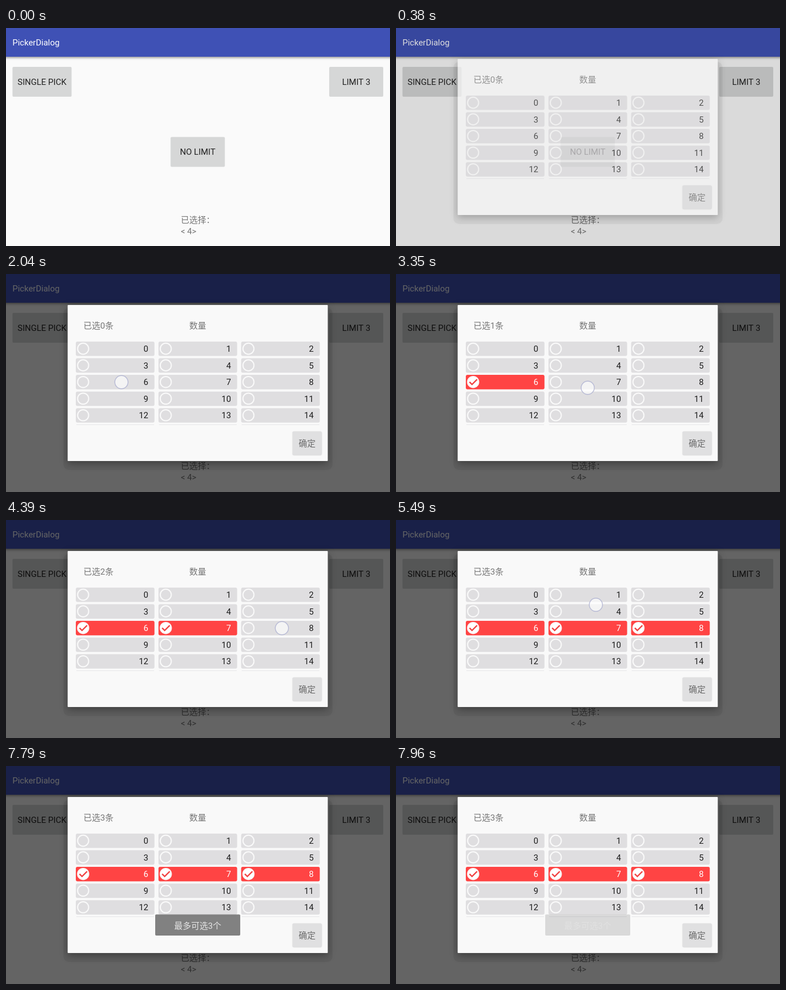
Write an HTML page with a canvas that moves like this. It is 682x387 px and loops after 8000 ms.

```html
<!DOCTYPE html>
<html lang="zh">
<head>
<meta charset="utf-8">
<style>
html, body { margin: 0; width: 682px; height: 387px; overflow: hidden; background: #fafafa; }
canvas { display: block; }
</style>
</head>
<body>
<canvas id="stage" width="682" height="387"></canvas>
<script>
const ctx = document.getElementById('stage').getContext('2d');
const LOOP = 8000;
const FONT = '15px Roboto, "Noto Sans CJK SC", "Noto Sans CJK", sans-serif';

// Stepped values: [start time, value]
const DIALOG = [[0, 0], [280, .3], [380, .72], [440, .9], [530, 1]];
const DIM = [[0, 0], [280, .04], [380, .13], [440, .35], [530, .6]];
const TOAST = [[0, 0], [5680, .15], [5740, .32], [5800, .5], [5850, .66], [5900, .8],
  [5955, .92], [6010, 1], [7790, .8], [7850, .6], [7910, .4], [7960, .22]];

// Taps: when, where, and which cell gets checked
const TAPS = [
  { at: 180, x: 622, y: 96 },
  { at: 2040, x: 205, y: 192, cell: 6 },
  { at: 3350, x: 340.5, y: 202, cell: 7 },
  { at: 4390, x: 490, y: 192, cell: 8 },
  { at: 5490, x: 355, y: 150.5 }
];

const stepAt = (steps, t) => steps.filter(s => s[0] <= t).pop()[1];

function box(x, y, w, h, fill, r = 2) {
  ctx.fillStyle = fill;
  ctx.beginPath();
  ctx.roundRect(x, y, w, h, r);
  ctx.fill();
}

function text(str, x, y, fill, align = 'left') {
  ctx.fillStyle = fill;
  ctx.textAlign = align;
  ctx.fillText(str, x, y);
}

function circle(x, y, r, fill, stroke, width) {
  ctx.beginPath();
  ctx.arc(x, y, r, 0, 7);
  ctx.fillStyle = fill;
  ctx.fill();
  ctx.strokeStyle = stroke;
  ctx.lineWidth = width;
  ctx.stroke();
}

function shadow(color, blur, dy) {
  ctx.shadowColor = color;
  ctx.shadowBlur = blur;
  ctx.shadowOffsetY = dy;
}

function button(label, x, y, w) {
  box(x, y, w, 53, '#d6d7d7');
  text(label, x + w / 2, y + 31.8, '#212121', 'center');
}

function page() {
  box(0, 0, 682, 387, '#fafafa', 0);
  ctx.save();
  shadow('rgba(0,0,0,.4)', 4, 1.5);
  box(-10, -10, 702, 61, '#3f51b5', 0);
  ctx.restore();
  text('PickerDialog', 11.5, 31, '#fff');
  button('SINGLE PICK', 11.5, 69, 105);
  button('LIMIT 3', 574, 69, 96);
  button('NO LIMIT', 292.3, 193.5, 96.4);
  text('已选择：', 310.5, 346, '#757575');
  text('< 4>', 310.5, 366, '#757575');
}

function cell(n, checked) {
  const x = 124 + n % 3 * 146.8, y = 120 + Math.floor(n / 3) * 29.55;
  box(x, y, 139.7, 25.6, checked ? '#ff4444' : '#dfdee0', 3);
  circle(x + 13, y + 12.6, 9.8, checked ? '#fff' : '#dfdee0', '#fafafa', 2);
  if (checked) {
    ctx.strokeStyle = '#f04343';
    ctx.lineWidth = 2.4;
    ctx.beginPath();
    ctx.moveTo(x + 6.5, y + 12.5);
    ctx.lineTo(x + 11, y + 17);
    ctx.lineTo(x + 20, y + 8);
    ctx.stroke();
  }
  text(n, x + 128.8, y + 18.2, checked ? '#fff' : '#1c1c1c', 'right');
}

function dialog(t) {
  const checked = TAPS.filter(p => p.cell && t >= p.at + 110).map(p => p.cell);
  box(102, 60, 478, 288, 'rgba(0,0,0,.06)', 10);
  ctx.save();
  shadow('rgba(0,0,0,.35)', 14, 4);
  box(109.5, 55, 462, 277, '#f9f9f9', 1);
  ctx.restore();
  text(`已选${checked.length}条`, 137.5, 97.3, '#757575');
  text('数量', 325.5, 97.3, '#757575');
  for (let n = 0; n < 15; n++) cell(n, checked.includes(n));
  for (let i = 0; i < 3; i++) box(125 + i * 146.8, 267, 138, 1, '#e6e6e8', 0);
  ctx.save();
  shadow('rgba(0,0,0,.2)', 2, .5);
  box(509, 279.5, 51.5, 41.5, '#e0e0e1');
  ctx.restore();
  text('确定', 534.7, 305.7, '#6a6a6a', 'center');
}

function touch(t) {
  for (const { at, x, y } of TAPS) {
    const age = t - at;
    if (age < 0 || age >= 170) continue;
    ctx.globalAlpha = age < 110 ? 1 : .5;
    circle(x, y, 11.7, 'rgba(255,255,255,.65)', 'rgba(165,170,205,.75)', 1.4);
  }
}

function toast() {
  box(265, 263.5, 151, 37.5, '#636363');
  text('最多可选3个', 340.5, 288.5, '#fff', 'center');
}

function draw(t) {
  ctx.font = FONT;
  ctx.globalAlpha = 1;
  page();
  box(0, 0, 682, 387, `rgba(0,0,0,${stepAt(DIM, t)})`, 0);
  fade(stepAt(DIALOG, t), () => dialog(t));
  touch(t);
  ctx.globalAlpha = stepAt(TOAST, t);
  if (ctx.globalAlpha) toast();
}

// Paints a group on its own layer so that overlapping parts fade as one
const layer = new OffscreenCanvas(682, 387);
function fade(alpha, paint) {
  if (!alpha) return;
  if (alpha === 1) return paint();
  const below = layer.getContext('2d');
  below.globalAlpha = 1;
  below.drawImage(ctx.canvas, 0, 0);
  paint();
  ctx.globalAlpha = 1 - alpha;
  ctx.drawImage(layer, 0, 0);
  ctx.globalAlpha = 1;
}

function frame() {
  draw(performance.now() % LOOP);
  requestAnimationFrame(frame);
}
frame();
</script>
</body>
</html>
```
